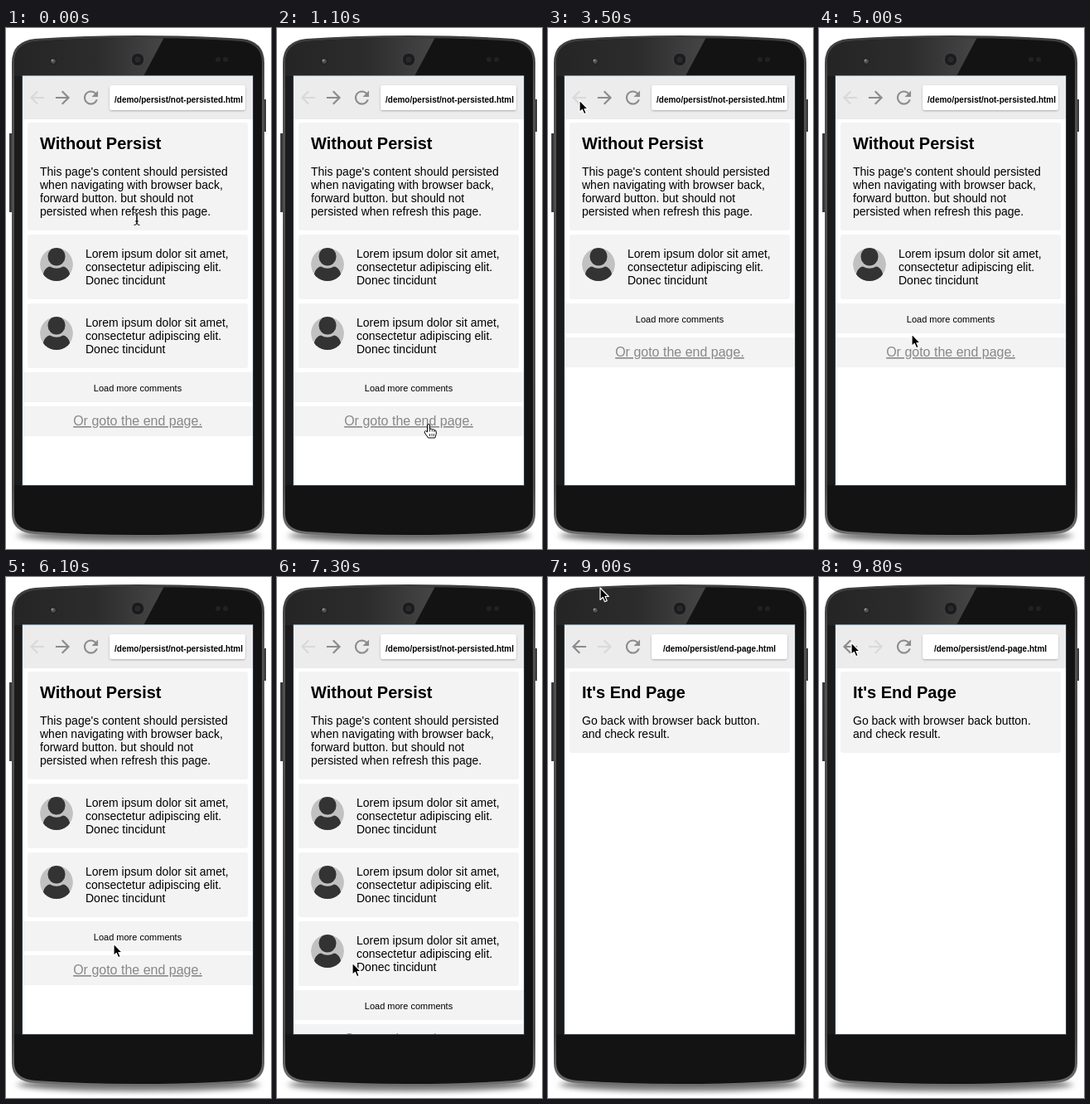
Recreate the animation shown at these times as an HTML page. Size 320x628 px, loop 10 s.

```html
<!DOCTYPE html>
<html lang="en">
<head>
<meta charset="utf-8">
<title>Without Persist</title>
<style>
  html, body { margin: 0; width: 100%; height: 100%; overflow: hidden; background: #fff; }
  svg { display: block; font: 14px "Liberation Sans", Arial, sans-serif; }
  .title { font-weight: bold; font-size: 20px; }
  .url { font-weight: bold; font-size: 10px; }
  .mid { text-anchor: middle; }
  .card { fill: #f3f3f3; }
</style>
</head>
<body>
<svg width="320" height="628" viewBox="0 0 320 628">
  <defs>
    <linearGradient id="gloss">
      <stop offset="0" stop-color="#242424"/>
      <stop offset=".55" stop-color="#2c2c2c"/>
      <stop offset="1" stop-color="#484848"/>
    </linearGradient>
    <linearGradient id="rim" x2="0" y2="1">
      <stop offset="0" stop-color="#3c3c3c"/>
      <stop offset=".12" stop-color="#505050"/>
      <stop offset=".9" stop-color="#4a4a4a"/>
      <stop offset="1" stop-color="#707070"/>
    </linearGradient>
    <filter id="blur" x="-10%" y="-100%" width="120%" height="300%"><feGaussianBlur stdDeviation="4 3"/></filter>
    <filter id="soft" x="-5%" y="-20%" width="110%" height="150%"><feDropShadow dx="0" dy="1" stdDeviation="1" flood-opacity=".28"/></filter>
    <clipPath id="body"><path d="M10 42Q10 19 36 16Q95 12 160 12Q225 12 284 16Q309 19 309 42V586Q309 605 284 607Q225 611 160 611Q95 611 36 607Q10 605 10 586Z"/></clipPath>
    <clipPath id="screen"><rect x="20" y="58" width="278" height="493"/></clipPath>
    <clipPath id="round"><circle cx="61" cy="285" r="20"/></clipPath>

    <g id="arrow"><path d="M20 11H7.83l5.59-5.59L12 4l-8 8 8 8 1.41-1.41L7.83 13H20z" transform="scale(1.07) translate(-12 -12)"/></g>
    <g id="comment">
      <rect class="card" x="26" y="249" width="266" height="78" rx="3"/>
      <g clip-path="url(#round)">
        <circle cx="61" cy="285" r="20" fill="#c1c1c1"/>
        <ellipse cx="61" cy="275.500" rx="10.500" ry="11" fill="#333"/>
        <path d="M44 306Q44 289 53 287.500Q61 292 69 287.500Q78 289 78 306Z" fill="#333"/>
      </g>
      <text x="96" y="277">Lorem ipsum dolor sit amet,</text>
      <text x="96" y="293">consectetur adipiscing elit.</text>
      <text x="96" y="309">Donec tincidunt</text>
    </g>
  </defs>

  <!-- phone -->
  <ellipse cx="160" cy="612" rx="146" ry="8" fill="#777" filter="url(#blur)"/>
  <path d="M4 127h4v95h-4zM311 86h3v39h-3z" fill="#3a3a3a"/>
  <path d="M7 42Q7 16 35 13Q95 9 160 9Q225 9 285 13Q312 16 312 42V586Q312 608 285 610Q225 614 160 614Q95 614 35 610Q7 608 7 586Z" fill="url(#rim)"/>
  <g clip-path="url(#body)">
    <path d="M0 0H320V628H0Z" fill="#131313"/>
    <path d="M0 0H197L166 58H0Z" fill="url(#gloss)"/>
    <path d="M0 58H20V551H0Z" fill="#1b1b1b"/>
  </g>
  <circle cx="159" cy="38" r="8" fill="#1f1f1f" stroke="#484848"/>
  <circle cx="159" cy="38" r="4.500" fill="#262a2e" stroke="#111"/>
  <circle cx="57" cy="40" r="3.500" fill="#505050" stroke="#191919"/>
  <circle cx="56" cy="39" r="1.300" fill="#8c8c8c"/>
  <circle cx="256" cy="38" r="3" fill="#222"/>
  <circle cx="265" cy="38" r="3" fill="#222"/>

  <!-- browser -->
  <path d="M19.500 57.500H298.500V551.500H19.500Z" fill="#fff" stroke="#31414d"/>
  <path d="M20 57.500H298" stroke="#7796aa"/>
  <g clip-path="url(#screen)">
    <path d="M20 58H298V110H20Z" fill="#ececec"/>
    <use id="back" href="#arrow" x="37.500" y="84"/>
    <use id="next" href="#arrow" transform="translate(68.500 84) scale(-1 1)"/>
    <path fill="#8c8c8c" transform="translate(102.500 84) scale(1.070) translate(-12 -12)" d="M17.650 6.350C16.200 4.900 14.210 4 12 4c-4.420 0-7.990 3.580-7.990 8s3.570 8 7.990 8c3.730 0 6.840-2.550 7.730-6h-2.080c-.820 2.330-3.040 4-5.650 4-3.310 0-6-2.690-6-6s2.690-6 6-6c1.660 0 3.140.690 4.220 1.780L13 11h7V4z"/>
    <rect x="125" y="69" width="164" height="30" rx="3" fill="#fff" filter="url(#soft)"/>

    <g id="main">
      <text class="url" x="131" y="90">/demo/persist/not-persisted.html</text>
      <rect class="card" x="26" y="114" width="266" height="130" rx="3"/>
      <text class="title" x="41" y="146">Without Persist</text>
      <text x="41" y="178">This page's content should persisted</text>
      <text x="41" y="194">when navigating with browser back,</text>
      <text x="41" y="210">forward button. but should not</text>
      <text x="41" y="226">persisted when refresh this page.</text>
      <use href="#comment"/>
      <use id="second" href="#comment" y="83"/>
      <use id="third" href="#comment" y="166"/>
      <g id="footer">
        <path class="card" d="M20 249H298V285H20ZM20 290H298V326H20Z"/>
        <text class="mid" x="159" y="272" font-size="11">Load more comments</text>
        <text class="mid" x="159" y="313" font-size="16" fill="#888" text-decoration="underline">Or goto the end page.</text>
      </g>
    </g>

    <g id="end">
      <text class="url mid" x="207" y="90">/demo/persist/end-page.html</text>
      <rect class="card" x="26" y="114" width="266" height="98" rx="3"/>
      <text class="title" x="41" y="146">It's End Page</text>
      <text x="41" y="178">Go back with browser back button.</text>
      <text x="41" y="194">and check result.</text>
    </g>
  </g>

  <!-- pointers, hot spot at 0,0 -->
  <g id="pointer" stroke-linejoin="round">
    <path id="arrowPtr" d="M0 0V14.500L3.300 11.500 5.600 16.700 8.200 15.600 6 10.500H10.300Z" stroke="#fff" stroke-width="1.200"/>
    <g id="beamPtr" fill="none">
      <path d="M-3.500-7.500Q0-7.500 0-5V5Q0 7.500-3.500 7.500M3.500-7.500Q0-7.500 0-5V5Q0 7.500 3.500 7.500M-2 3H2" stroke="#fff" stroke-width="2.500"/>
      <path d="M-3.500-7.500Q0-7.500 0-5V5Q0 7.500-3.500 7.500M3.500-7.500Q0-7.500 0-5V5Q0 7.500 3.500 7.500M-2 3H2" stroke="#000"/>
    </g>
    <g id="handPtr" stroke="#000">
      <path d="M-1.500 9V1Q-1.500-.500 0-.500T1.500 1V5.500Q3.500 4.300 4.300 6Q6 5 6.900 6.800Q9.300 6.300 9.300 9V11L7.800 16H-.500L-4.600 10Q-5.500 8-3.500 7.500Z" fill="#fff"/>
      <path d="M1.500 5.500V8.500M4.300 6V8.500M6.900 6.800V9M1.500 11V14M4 11V14M6.300 11V14" fill="none" stroke-width=".8"/>
    </g>
  </g>
</svg>
<script>
const $ = id => document.getElementById(id);
const LOOP = 10000, STEP = 100;

// pointer path: time, x, y
const path = [
  [0, 158, 230], [300, 228, 66], [600, 92, 330], [900, 183, 481], [1000, 183, 481],
  [1100, 183, 478], [1800, 183, 478], [2600, 61, 101], [2900, 41, 89], [3100, 38, 87],
  [3600, 38, 87], [4200, 65, 85], [4400, 65, 85], [4500, 66, 84], [4600, 66, 84],
  [5000, 112, 369], [5200, 130, 352], [5400, 130, 352], [5700, 129, 427], [6200, 130, 444],
  [6500, 130, 444], [6900, 172, 200], [7300, 91, 465], [7600, 129, 520], [8100, 137, 541],
  [8600, 137, 541], [9000, 63, 13], [9200, 58, 5], [9700, 39, 78], [9800, 39, 79], [LOOP, 39, 79]
];

function pointerAt(t) {
  const i = path.findIndex(k => k[0] > t);
  const [t0, x0, y0] = path[i - 1], [t1, x1, y1] = path[i];
  const u = (t - t0) / (t1 - t0), e = u * u * (3 - 2 * u);
  return [x0 + (x1 - x0) * e, y0 + (y1 - y0) * e].map(Math.round);
}

const within = (t, a, b) => t >= a && t < b;
const show = (id, on) => $(id).style.display = on ? "" : "none";

function draw(now) {
  const t = Math.floor(now % LOOP / STEP) * STEP;
  const end = within(t, 1700, 3400) || t >= 8400;
  const count = t < 1700 ? 2 : t < 5400 ? 1 : t < 6400 ? 2 : 3;

  show("main", !end);
  show("end", end);
  show("second", count > 1);
  show("third", count > 2);
  $("footer").setAttribute("transform", `translate(0 ${83 * count})`);
  $("back").setAttribute("fill", end ? "#8c8c8c" : "#d9d9d9");
  $("next").setAttribute("fill", end ? "#d9d9d9" : "#8c8c8c");

  const hand = within(t, 900, 1700) || within(t, 8100, 8400);
  const beam = t < 200;
  show("handPtr", hand);
  show("beamPtr", beam);
  show("arrowPtr", !hand && !beam);
  $("pointer").setAttribute("transform", `translate(${pointerAt(t)})`);
}

const start = performance.now();
(function tick() {
  draw(performance.now() - start);
  requestAnimationFrame(tick);
})();
</script>
</body>
</html>
```
